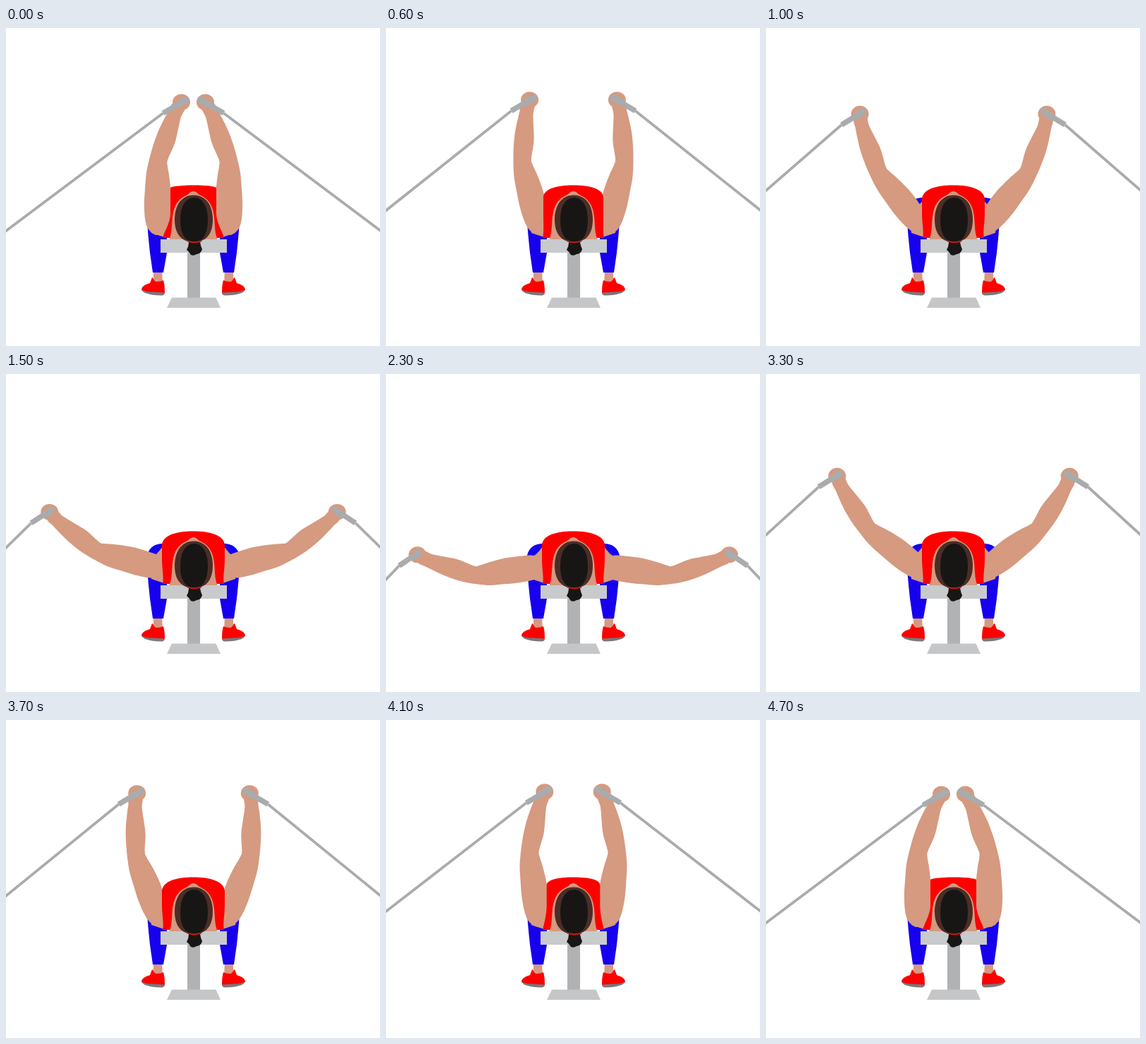
An HTML page for the animation above (4.8 s loop, 530 by 450 pixels).

```html
<!DOCTYPE html>
<html lang="en">
<head>
<meta charset="utf-8">
<title>Cable fly</title>
<style>
  html, body { margin: 0; width: 100%; height: 100%; overflow: hidden; background: #fff; }
  svg { display: block; width: 530px; height: 450px; }
  .skin { fill: #d59a80; }
  .red { fill: #fe0000; }
  .blue { fill: #1600ee; }
  .metal { stroke: #a9abad; fill: none; }
</style>
</head>
<body>
<svg viewBox="0 0 530 450">
  <g id="leg">
    <path class="skin" d="M209 342H221L222 364H209Z"/>
    <path class="blue" d="M222 240C211 240 201 246 199.500 260C200 280 202 299 204 318L208 346H223L228 318V298L224 285Z"/>
    <path class="red" d="M192 371C192 365 198 363 204 361L207 353C209 353 209 358 213 359Q219 359 223 357Q225 363 225 375Q207 378 192 371Z"/>
    <path fill="#77797b" d="M192 370Q199 374 208 373.500L225 374.500Q225 378 221 378.500Q206 378 201 376Q194 375 192 370Z"/>
  </g>
  <use href="#leg" transform="matrix(-1 0 0 1 531 0)"/>

  <path fill="#b0b2b4" d="M257 317H275V383H257Z"/>
  <path fill="#c5c6c8" d="M235 381.500H297.500L304 396H228Z"/>
  <path fill="#c9cacc" d="M219 299H313V318H219Z"/>

  <g id="arm">
    <path id="cable" class="metal" stroke-width="3.800"/>
    <path class="skin" d="M224 242L214 254L203 262L206 290L224 296L236 298V250Z"/>
    <path id="limb" class="skin"/>
    <ellipse id="fist" class="skin" rx="12.500" ry="11.500"/>
    <path id="handle" class="metal" stroke-width="7.500"/>
    <path id="grip" class="metal" stroke-width="10" stroke-linecap="round"/>
  </g>
  <use href="#arm" transform="matrix(-1 0 0 1 531 0)"/>

  <path id="top" class="red"/>
  <path class="skin" d="M231.500 299C238 283 232 264 242 248C249 237 257 238 261 232.500Q265.500 229.500 270 232.500C274 238 282 237 289 248C299 264 293 283 299.500 299Z"/>
  <path fill="#4b2d27" d="M266 236.500C284 236.500 293 252 293 271C293 291 284 303 266 303C248 303 239 291 239 271C239 252 248 236.500 266 236.500Z"/>
  <path fill="#171614" d="M266.500 240C279 240 286 253 286 272C286 291 279 303 266.500 303C254 303 247 291 247 272C247 253 254 240 266.500 240Z"/>
  <path fill="#171614" d="M259 303H275Q276 309 278 313Q276 320 270 320Q266 323 262 321Q260 317 256 314Q259 309 259 303Z"/>
  <path d="M257 301.500Q266 305 277 301.500" fill="none" stroke="#c8161a" stroke-width="2"/>
</svg>
<script>
const LOOP = 4800, STEP = 100;
const shoulder = [213, 274], UPPER = 87, FORE = 88;

// [time, upper arm angle from vertical]
const keys = [[0, -2], [600, 13], [1000, 37.5], [1200, 51], [1500, 74.5], [1800, 88],
  [2350, 97.3], [3000, 77], [3350, 47], [3700, 19], [4200, 4], [4700, -2]];

// [distance along the bone, offset to the outer side]
const upperOuter = [[-19, 0], [-11, 11], [3, 16], [25, 18], [48, 17.5], [72, 16]];
const foreOuter = [[10, 14], [35, 15], [55, 13.5], [70, 11.5], [84, 9]];
const foreInner = [[84, -8], [68, -8], [50, -10.5], [30, -13], [6, -12]];
const upperInner = [[80, -13], [65, -16], [42, -19], [18, -19], [0, -17], [-14, -8]];

const el = id => document.getElementById(id);
const parts = Object.fromEntries(['cable', 'limb', 'fist', 'handle', 'grip', 'top'].map(id => [id, el(id)]));
const fmt = p => p.map(v => v.toFixed(2)).join(' ');
const draw = (part, d) => part.setAttribute('d', d);

function keyAt(i) {
  const n = keys.length, turn = Math.floor(i / n);
  const [t, v] = keys[i - turn * n];
  return [t + turn * LOOP, v];
}

// Monotone slope: flat at extremes, harmonic mean elsewhere
function slopeAt(i) {
  const [a, b, c] = [keyAt(i - 1), keyAt(i), keyAt(i + 1)];
  const l = (b[1] - a[1]) / (b[0] - a[0]), r = (c[1] - b[1]) / (c[0] - b[0]);
  return l * r <= 0 ? 0 : 2 * l * r / (l + r);
}

function angleAt(t) {
  let i = keys.length - 1;
  while (keys[i][0] > t) i--;
  const [t0, a] = keyAt(i), [t1, b] = keyAt(i + 1);
  const h = t1 - t0, u = (t - t0) / h, w = 1 - u;
  return a * w * w * (1 + 2 * u) + b * u * u * (3 - 2 * u)
    + h * u * w * (w * slopeAt(i) - u * slopeAt(i + 1));
}

function bone(origin, degrees) {
  const a = degrees * Math.PI / 180, s = Math.sin(a), c = Math.cos(a);
  return ([along, out]) => [origin[0] - along * s - out * c, origin[1] - along * c + out * s];
}

function smoothLoop(pts) {
  const n = pts.length, at = i => pts[(i + n) % n];
  const ctrl = (p, q, r, k) => [p[0] + (r[0] - q[0]) * k, p[1] + (r[1] - q[1]) * k];
  let d = 'M' + fmt(pts[0]);
  for (let i = 0; i < n; i++) {
    const [a, b, c, e] = [at(i - 1), at(i), at(i + 1), at(i + 2)];
    d += 'C' + [ctrl(b, a, c, 1 / 6), ctrl(c, b, e, -1 / 6), c].map(fmt).join(' ');
  }
  return d + 'Z';
}

function render(t) {
  const angle = angleAt(t);
  const upper = bone(shoulder, angle);
  const fore = bone(upper([UPPER, 0]), angle - 19 - Math.max(0, angle - 40) * 0.13);
  const [x, y] = fore([FORE, 0]);

  draw(parts.limb, smoothLoop([...upperOuter.map(upper), ...foreOuter.map(fore),
    ...foreInner.map(fore), ...upperInner.map(upper)]));
  parts.fist.setAttribute('transform', `translate(${fmt([x + 1, y])})`);

  const tip = [x - 25, y + 15.5], end = [x + 7 - angle * 0.05, y - 3];
  const mid = [x - 4, y + 3];
  draw(parts.handle, `M${fmt(tip)}L${fmt(end)}`);
  draw(parts.grip, `M${fmt(mid)}L${fmt(end)}`);
  const slope = 0.755 + 0.003 * angle;
  draw(parts.cable, `M${fmt(tip)}L${fmt([-20, tip[1] + slope * (tip[0] + 20)])}`);

  // A raised arm covers the side of the top
  const cover = Math.min(1, Math.max(0, (16 - angle) / 18));
  const side = 221 + 12 * cover, corner = 243 - 17 * cover, bend = 228 - 3 * cover;
  const m = 531;
  draw(parts.top, `M222 297C224 288 ${side} 276 ${side} 262V${corner}C${side} ${bend} 242 222.5 265.5 222.5
    C${m - 242} 222.5 ${m - side} ${bend} ${m - side} ${corner}V262C${m - side} 276 ${m - 224} 288 ${m - 222} 297Z`);
}

const start = performance.now();
function tick() {
  const t = (performance.now() - start) % LOOP;
  render(Math.floor(t / STEP) * STEP);
  requestAnimationFrame(tick);
}
tick();
</script>
</body>
</html>
```
